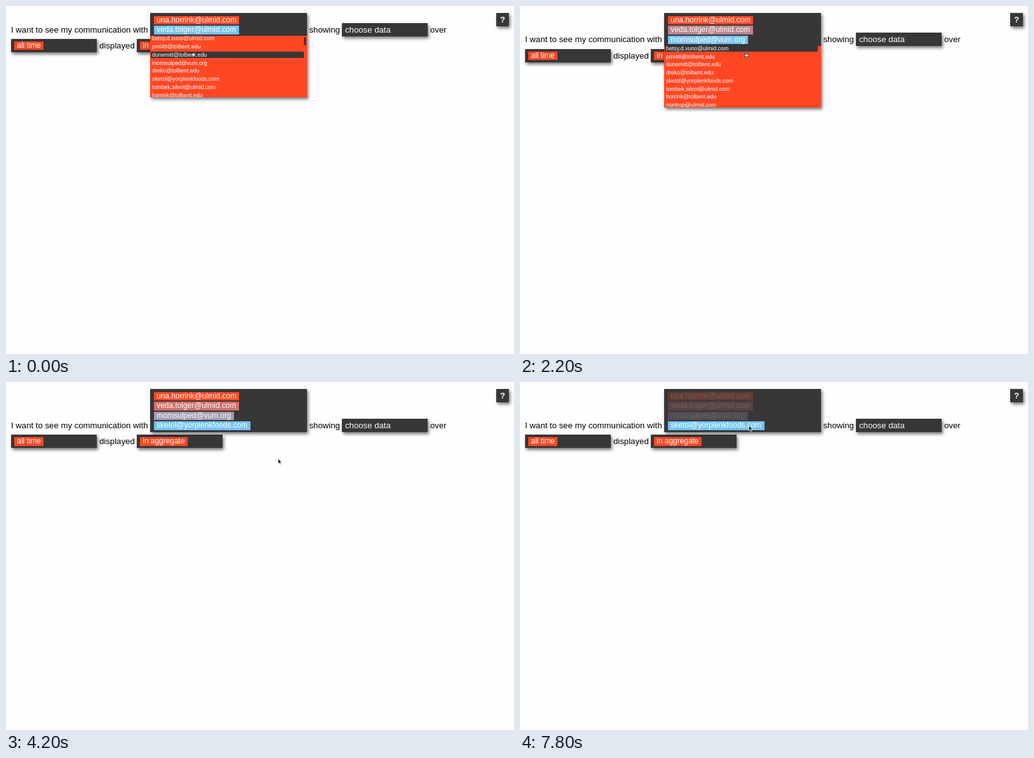
Animation, 800 px wide and 549 px high, one loop 8 s. Source, as an HTML page:

```html
<!DOCTYPE html>
<html lang="en">
<head>
<meta charset="utf-8">
<title>Contact picker</title>
<style>
  html, body { margin: 0; width: 100%; height: 100%; overflow: hidden; background: #fefdff; }
  #stage { position: relative; width: 800px; height: 549px; overflow: hidden;
    font: 13.2px/21px "Liberation Sans", Arial, sans-serif; color: #000; white-space: pre; }
  #stage div, #stage svg { position: absolute; }
  #line { left: 0; }
  #stage .box { height: 21px; color: #fff; background: #383637; box-shadow: 2px 3px 5px rgba(0, 0, 0, .55); }
  #stage .pill { left: 5px; height: 13.4px; padding: 0 4.3px; background: #ff4724; color: #fff;
    font-size: 11.9px; line-height: 13.4px; }
  #help { left: 772px; top: 11px; width: 20px; text-align: center; font-weight: bold; }
  #picker { left: 227px; top: 11px; width: 247px; }
  #menu { left: 227px; width: 247px; height: 97px; overflow: hidden; background: #ff4724;
    box-shadow: 2px 3px 5px rgba(0, 0, 0, .55); }
  #stage .row { left: 1px; width: 241px; height: 10.4px; padding-left: 2px; box-sizing: border-box;
    color: #fff; font-size: 8.8px; line-height: 10.4px; }
  #thumb { left: 242px; top: 2px; width: 4px; height: 13px; border-radius: 2px; background: #6b2a20; }
  #cursor { left: 0; top: 0; overflow: visible; }
</style>
</head>
<body>
<div id="stage">
  <div id="line">
    <div style="left:8px;top:26.5px">I want to see my communication with</div>
    <div style="left:477.5px;top:26.5px">showing</div>
    <div class="box" style="left:529px;top:26.5px;width:130px;padding-left:5px">choose data</div>
    <div style="left:668px;top:26.5px">over</div>
    <div class="box" style="left:8px;top:52px;width:135px"><div class="pill" style="top:4px">all time</div></div>
    <div style="left:147px;top:52px">displayed</div>
    <div class="box" style="left:206px;top:52px;width:135px"><div class="pill" style="top:4px">in aggregate</div></div>
  </div>
  <div class="box" id="help">?</div>
  <div class="box" id="picker"></div>
  <div id="menu"><div id="rows"></div><div id="thumb"></div></div>
  <svg id="cursor" width="12" height="12">
    <path id="cross" d="M-4 0H4M0-4V4"/>
    <path id="crossCore" d="M-3.3 0H3.3M0-3.3V3.3"/>
    <path id="arrow" d="M0 0V8L1.9 6.3L3.2 9.3L4.6 8.7L3.3 5.8H5.8Z" fill="#111" stroke="#fff" stroke-width=".7"/>
  </svg>
</div>
<script>
const STEP = 200, STEPS = 40;
const PITCH = 15.6, ROW_PITCH = 12.75;
const ADD_THIRD = 7, OPEN_AGAIN = 10, ADD_FOURTH = 19;
const RED = [255, 71, 36], BLUE = [116, 195, 243];

const chosen = ['una.horrink@ulmid.com', 'veda.tolger@ulmid.com',
  'mornsulped@vum.org', 'sketol@yorplenkfoods.com'];
const contacts = ['betsy.d.vuno@ulmid.com', 'pmi48@tolbent.edu', 'dunemitt@tolbent.edu',
  chosen[2], 'dreko@tolbent.edu', chosen[3], 'tombek.silvot@ulmid.com',
  'horrink@tolbent.edu', 'noritrup@ulmid.com', 'mivomo@tolbent.edu', 'emmorlub@tolbent.edu'];

// [step, x, y]
const path = [[0, 295, 77], [2, 295, 79], [5, 290, 89], [7, 289, 90], [8, 310, 84], [9, 372, 66],
  [10, 374, 58], [11, 357, 78], [13, 350, 86], [15, 338, 91], [19, 337, 91], [20, 380, 108],
  [21, 428.5, 121], [25, 428.5, 121], [29, 519, 106], [32, 519, 106], [34, 405, 80],
  [35, 380, 72], [36, 374, 71], [39, 360.5, 69]];
const scrolling = [[0, 0], [14, 0], [17, 26.6]];

const el = id => document.getElementById(id);

function make(parent, cls, text) {
  const node = document.createElement('div');
  node.className = cls;
  node.textContent = text;
  return parent.appendChild(node);
}

function sample(keys, step) {
  const next = keys.findIndex(k => k[0] >= step);
  if (next < 0) return keys[keys.length - 1].slice(1);
  if (next === 0) return keys[0].slice(1);
  const a = keys[next - 1], b = keys[next];
  const u = (step - a[0]) / (b[0] - a[0]);
  return a.slice(1).map((v, i) => v + (b[i + 1] - v) * u);
}

function tint(i, count) {
  const u = i < count ? i / (count - 1) : 0;
  return `rgb(${RED.map((v, c) => Math.round(v + (BLUE[c] - v) * u))})`;
}

const pills = chosen.map((name, i) => {
  const pill = make(el('picker'), 'pill', name);
  pill.style.left = '6px';
  pill.style.top = 4.6 + PITCH * i + 'px';
  return pill;
});
const rows = contacts.map(name => make(el('rows'), 'row', name));

for (const [id, color, width] of [['cross', '#222', 3], ['crossCore', '#fff', 1.4]]) {
  el(id).style.cssText = `stroke:${color};stroke-width:${width}`;
}

function show(step) {
  const count = step < ADD_THIRD ? 2 : step < ADD_FOURTH ? 3 : 4;
  const justAdded = step === ADD_THIRD || step === ADD_FOURTH;
  const open = step < ADD_THIRD || (step >= OPEN_AGAIN && step < ADD_FOURTH);
  const shift = PITCH * (count - 2);
  const menuTop = 47.3 + shift;
  const [x, y] = sample(path, step);
  const [scroll] = sample(scrolling, step);

  el('line').style.top = shift + 'px';
  el('picker').style.height = 36.3 + shift + 'px';

  const focused = step >= 35 ? 3 : -1;
  pills.forEach((pill, i) => {
    pill.style.display = i < count ? '' : 'none';
    pill.style.background = tint(i, justAdded ? count - 1 : count);
    pill.style.opacity = focused < 0 || i === focused ? 1 : .22;
  });

  el('menu').style.display = open ? '' : 'none';
  el('menu').style.top = menuTop + 'px';
  el('thumb').style.display = step < ADD_THIRD || step > OPEN_AGAIN + 2 ? '' : 'none';

  // The highlight trails the pointer by one step.
  const trailing = sample(path, step - 1)[1];
  const hovered = Math.max(0, Math.round((trailing - menuTop - 4.3 + scroll) / ROW_PITCH));
  let slot = 0;
  rows.forEach((row, i) => {
    const used = chosen.indexOf(contacts[i]);
    const free = used < 0 || used >= count;
    row.style.display = free ? '' : 'none';
    if (!free) return;
    row.style.top = slot * ROW_PITCH - .9 - scroll + 'px';
    row.style.background = slot === hovered ? '#383637' : 'none';
    slot++;
  });

  const crosshair = open || step === ADD_THIRD;
  el('cross').style.display = el('crossCore').style.display = crosshair ? '' : 'none';
  el('arrow').style.display = crosshair ? 'none' : '';
  el('cursor').style.transform = `translate(${x}px, ${y}px)`;
}

let shown = -1;
function tick() {
  const step = Math.floor(performance.now() / STEP) % STEPS;
  if (step !== shown) show(shown = step);
  requestAnimationFrame(tick);
}
tick();
</script>
</body>
</html>
```
